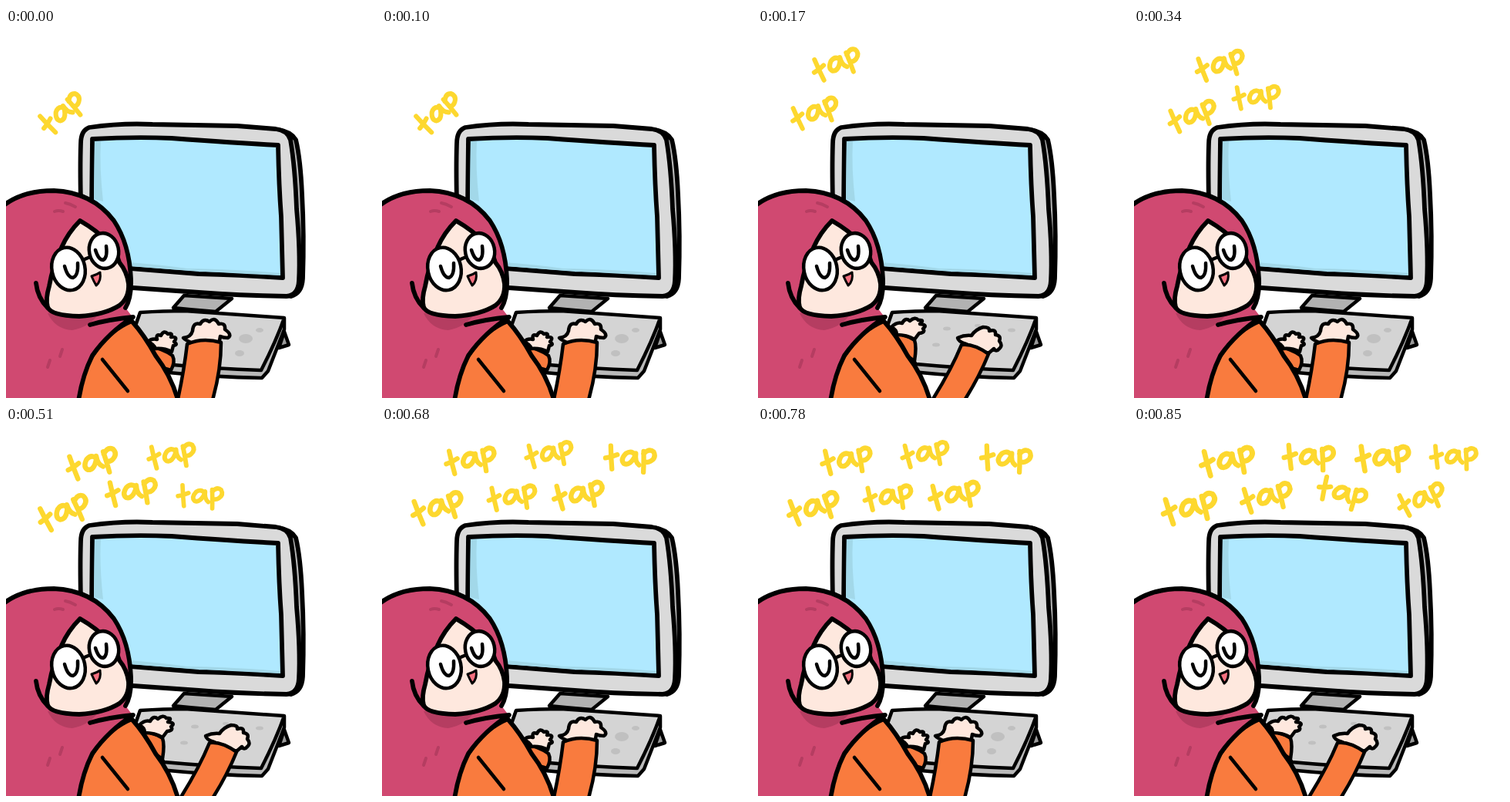
An HTML page for the animation above (1.02 s loop, 480x480 px).

```html
<!DOCTYPE html>
<html lang="en">
<head>
<meta charset="utf-8">
<title>Typing</title>
<style>
  html, body { margin: 0; width: 100%; height: 100%; overflow: hidden; background: #fff; }
  svg { display: block; width: 100vw; height: 100vh; }
  .ink { stroke: #000; stroke-width: 5.8; stroke-linecap: round; stroke-linejoin: round; }
  .line { fill: none; }
  .skin { fill: #fee8de; }
  .scarf { fill: #d04971; }
  .shade { fill: #b53d61; }
  .shirt { fill: #f97b3e; }
  .spot { fill: #c0c0c0; }
  .thin { stroke-width: 4.5; }
  .taps { fill: none; stroke: #fdd82f; stroke-width: 6.3; stroke-linecap: round; stroke-linejoin: round; }
  .taps g {
    visibility: hidden;
    animation: beat 1020ms step-end calc(var(--i) * 170ms - 1020ms) infinite;
  }
  .pose { visibility: hidden; animation: swap 340ms step-end infinite; }
  .pose.b { animation-delay: -170ms; }
  @keyframes beat { 0% { visibility: visible } 16.6667%, 100% { visibility: hidden } }
  @keyframes swap { 0% { visibility: visible } 50%, 100% { visibility: hidden } }
</style>
</head>
<body>
<svg viewBox="0 0 480 480" role="img" aria-label="Typing: tap tap tap">
  <defs>
    <g id="tap">
      <path d="M-25-15Q-24 0-22 15M-31 1Q-24 0-16-4"/>
      <path d="M7-5Q2-11-5-6Q-12 2-7 7Q0 10 6-1L8-7Q7 4 13 8"/>
      <path d="M18-10Q19 4 19 17M18-7Q25-15 31-10Q35-3 28 2Q24 5 19 3"/>
    </g>
  </defs>

  <!-- monitor -->
  <g class="ink">
    <path fill="#b5b5b5" d="M352 132Q369 134 376 145Q382 170 384 215Q387 270 385 325Q384 344 370 348L350 340Z"/>
    <path fill="#dadada" d="M108 129Q150 123 190 125L300 127L350 131Q365 133 369 145Q375 180 377 235Q382 290 380 328Q379 347 364 348Q300 347 250 343L150 336L97 225Q96 180 97 150Q97 133 108 129Z"/>
    <path fill="#b0e9ff" d="M112 144Q165 141 215 143Q295 149 353 152Q354 205 357 245L359 324Q300 320 250 319L150 311L111 235Z"/>
  </g>
  <path fill="#a2d8e9" d="M115 147H123Q121 180 126 225L114 222ZM160 304Q200 307 235 312Q300 313 356 318V321Q260 317 160 309Z"/>

  <!-- stand and keyboard -->
  <path class="ink thin" fill="#b2b2b2" d="M231 347L217 363Q245 366 272 368L293 351Z"/>
  <path class="ink thin" fill="#999" d="M361 394L367 411L354 415Z"/>
  <g class="ink thin">
    <path fill="#b9b9b9" d="M174 370L166 391L200 446Q270 453 332 454L340 445L361 391V377Z"/>
    <path fill="#d4d4d4" d="M174 369Q205 367 232 367Q290 371 361 376Q351 405 331 444Q270 442 205 436L168 386Z"/>
  </g>

  <!-- hands, far sleeve and forearm -->
  <g class="pose a">
    <g class="spot">
      <ellipse cx="311" cy="403" rx="9" ry="6"/>
      <ellipse cx="329" cy="392" rx="5" ry="3"/>
      <ellipse cx="303" cy="422" rx="6" ry="4"/>
    </g>
    <g class="ink thin">
      <path class="shirt" d="M188 414Q202 415 216 425Q220 433 214 444L200 440Z"/>
      <path class="skin" d="M194 416Q192 410 184 407Q189 402 196 404Q194 396 201 399Q205 391 210 397Q217 395 214 401Q224 400 218 407Q224 411 217 412L215 420Q205 415 194 416Z"/>
      <path class="skin" d="M240 408Q233 405 230 402Q240 401 242 393Q243 381 252 384Q256 376 264 381Q271 374 276 384Q285 382 284 391Q294 398 288 402Q282 402 278 400L276 411Z"/>
      <path class="shirt" d="M235 410Q255 401 279 408Q279 445 267 486H222Q231 445 235 410Z"/>
    </g>
  </g>
  <g class="pose b">
    <g class="spot">
      <ellipse cx="245" cy="390" rx="5" ry="2.5"/>
      <ellipse cx="231" cy="411" rx="5" ry="2.5"/>
      <ellipse cx="329" cy="392" rx="5" ry="2.5"/>
      <ellipse cx="285" cy="386" rx="4" ry="2"/>
    </g>
    <g class="ink thin">
      <path class="shirt" d="M172 396Q190 396 203 405Q206 413 203 432L186 420Z"/>
      <path class="skin" d="M180 398Q180 391 173 388Q180 381 187 383Q191 375 197 380Q204 374 208 379Q217 378 210 384Q221 385 214 390Q218 395 209 396L203 404Q193 398 180 398Z"/>
      <path class="skin" d="M270 410Q260 407 259 402Q268 398 277 399Q282 391 292 388Q301 388 300 393Q309 390 308 398Q316 399 313 406Q318 412 313 416Q309 421 306 416L299 422Z"/>
      <path class="shirt" d="M264 411Q280 409 299 423Q287 453 266 486H224Q250 445 264 411Z"/>
    </g>
  </g>

  <!-- body and headscarf -->
  <path class="ink shirt" d="M163 380Q180 399 194 425Q215 452 224 486H90Q105 405 163 380Z"/>
  <path class="ink line thin" d="M125 430Q141 450 158 471"/>
  <path class="scarf" d="M0 229Q22 211 62 211Q112 213 140 250Q160 280 162 325Q163 350 155 363L165 376Q130 399 112 425Q99 451 94 480H0Z"/>
  <path class="shade" d="M54 370Q64 391 86 392Q108 388 119 372Z"/>
  <path class="ink line" d="M-3 230Q22 211 62 211Q112 213 140 250Q160 280 162 325Q163 350 155 363M109 385Q133 378 165 375Q133 395 112 425Q99 451 94 484"/>
  <path class="ink line" d="M39 331Q41 350 54 363"/>
  <path d="M77 227Q83 228 90 232M63 238Q68 236 74 238M73 417L70 426M57 431L54 440" fill="none" stroke="#b53d61" stroke-width="4" stroke-linecap="round"/>

  <!-- face -->
  <path class="ink skin" d="M96 250Q80 266 72 285Q61 307 56 335Q51 352 54 362Q58 373 95 374Q128 372 147 360Q160 350 159 332Q157 316 147 304Q139 275 96 250Z"/>
  <g class="ink thin">
    <path class="line" d="M102 300L109 297"/>
    <ellipse cx="81" cy="312.5" rx="21.5" ry="28" fill="#fff" transform="rotate(-12 81 312.5)"/>
    <ellipse cx="127" cy="289" rx="19" ry="23" fill="#fff" transform="rotate(-12 127 289)"/>
    <path class="line" d="M76 309Q80 324 87 324Q94 321 93 305M116 288Q120 301 126 301Q132 298 130 283"/>
    <path d="M111 322Q118 320 122 317Q124 328 117 334Q114 329 111 322Z" fill="#f4707f" stroke-width="3"/>
  </g>

  <g class="taps">
    <g style="--i:0">
      <use href="#tap" transform="translate(72 111) rotate(-38) scale(.96)"/>
    </g>
    <g style="--i:1">
      <use href="#tap" transform="translate(73 110) rotate(-19) scale(.96)"/>
      <use href="#tap" transform="translate(101 47) rotate(-19) scale(.97)"/>
    </g>
    <g style="--i:2">
      <use href="#tap" transform="translate(111 48) rotate(-15) scale(.98)"/>
      <use href="#tap" transform="translate(75 114) rotate(-18) scale(.97)"/>
      <use href="#tap" transform="translate(158 89) rotate(-5) scale(.93)"/>
    </g>
    <g style="--i:3">
      <use href="#tap" transform="translate(111 48) rotate(-15) scale(1.02)"/>
      <use href="#tap" transform="translate(74 112) rotate(-22) scale(1.03)"/>
      <use href="#tap" transform="translate(162 85) rotate(-8) scale(1.01)"/>
      <use href="#tap" transform="translate(214 38) rotate(-8) scale(.94)"/>
      <use href="#tap" transform="translate(251 91) rotate(2) scale(.9)"/>
    </g>
    <g style="--i:4">
      <use href="#tap" transform="translate(114 44) rotate(-8)"/>
      <use href="#tap" transform="translate(216 36) rotate(-9) scale(.94)"/>
      <use href="#tap" transform="translate(321 42) rotate(3)"/>
      <use href="#tap" transform="translate(71 106) rotate(-16) scale(1.04)"/>
      <use href="#tap" transform="translate(168 92) rotate(-7) scale(.96)"/>
      <use href="#tap" transform="translate(254 89) rotate(-9) scale(1.01)"/>
    </g>
    <g style="--i:5">
      <use href="#tap" transform="translate(120 45) rotate(-9) scale(1.07)"/>
      <use href="#tap" transform="translate(226 40) rotate(0) scale(1.01)"/>
      <use href="#tap" transform="translate(322 41) rotate(-3) scale(1.06)"/>
      <use href="#tap" transform="translate(414 40) rotate(0) scale(.92)"/>
      <use href="#tap" transform="translate(71 106) rotate(-12) scale(1.09)"/>
      <use href="#tap" transform="translate(171 92) rotate(-12) scale(1.02)"/>
      <use href="#tap" transform="translate(269 87) rotate(17) scale(.97)"/>
      <use href="#tap" transform="translate(372 95) rotate(-21) scale(.96)"/>
    </g>
  </g>
</svg>
</body>
</html>
```
